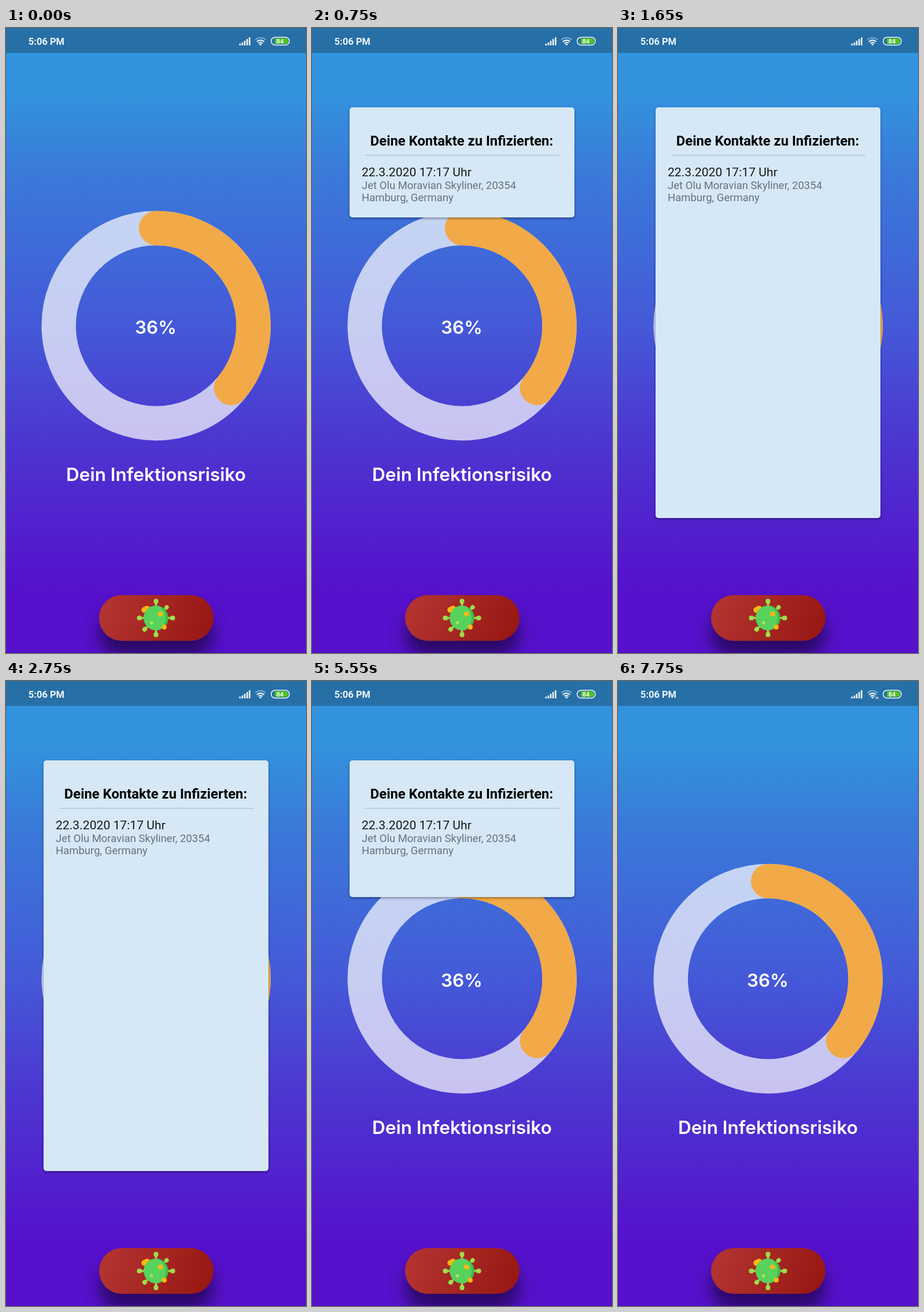
These frames come from a looping animation (519x1079 px, 8 s). An HTML page:

```html
<!DOCTYPE html>
<html lang="de">
<head>
<meta charset="utf-8">
<title>Infektionsrisiko</title>
<style>
  html, body { margin: 0; width: 100%; height: 100%; overflow: hidden; background: #5511cb; }
  svg { display: block; }
  .stage { position: absolute; left: 0; top: 0; width: 519px; height: 1079px; overflow: hidden;
    background: linear-gradient(#3294de 105px, #3a7ad9 250px, #4459d8 515px, #4c38d1 700px, #5511cb 970px); }
  .stage > svg { position: absolute; left: 0; top: 0; }

  .button { position: absolute; left: 160.5px; top: 979px; width: 198px; height: 79px; border-radius: 40px;
    background: linear-gradient(110deg, #b23330 8%, #981713 95%);
    box-shadow: 0 27px 28px rgba(0, 0, 0, .5); }

  .card { position: absolute; left: 65px; top: 137px; width: 389px; height: 0; opacity: 0; overflow: hidden;
    border-radius: 5px; background: #d6e8f6; box-shadow: 0 2px 4px rgba(0, 0, 0, .38);
    animation: card 8s step-end infinite; }
  .traffic { opacity: 0; animation: traffic 8s step-end infinite; }

  /* One step is 50 ms = 0.625 % */
  @keyframes card {
    0%      { height: 0; opacity: 0; }
    8.75%   { height: 71px; opacity: 1; }
    9.375%  { height: 190px; opacity: 1; }
    10%     { height: 310px; opacity: 1; }
    10.625% { height: 430px; opacity: 1; }
    11.25%  { height: 430px; opacity: 1; }
    11.875% { height: 662px; opacity: 1; }
    12.5%   { height: 709px; opacity: 1; }
    67.5%   { height: 591px; opacity: 1; }
    68.125% { height: 473px; opacity: 1; }
    68.75%  { height: 355px; opacity: 1; }
    69.375% { height: 236px; opacity: 1; }
    70%     { height: 118px; opacity: 1; }
    70.625%, 100% { height: 0; opacity: 0; }
  }
  @keyframes traffic {
    0%      { opacity: 0; }
    96.875%, 100% { opacity: .9; }
  }

  .roboto { font-family: Roboto, "Noto Sans", sans-serif; }
  .risk { font: 600 31.5px Inter, "Open Sans", sans-serif; fill: #fff; text-anchor: middle; }
</style>
</head>
<body>
<div class="stage">
  <div class="button"></div>

  <svg width="519" height="1079" viewBox="0 0 519 1079">
    <!-- status bar -->
    <rect width="519" height="43" fill="#000" fill-opacity=".25"/>
    <g class="roboto" fill="#f2f7fb">
      <text x="38.8" y="28.6" font-size="16.5" font-weight="700">5:06 PM</text>
      <path d="M403.5 30v-3h2.6v3zM407.6 30v-5h2.6v5zM411.7 30v-8h2.6v8zM415.9 30v-11h2.6v11zM420.1 30v-14h2.6v14z"/>
      <g fill="none" stroke="#f2f7fb" stroke-width="2.1">
        <path d="M431.4 20.6a12.6 12.6 0 0 1 17.8 0" opacity=".42"/>
        <path d="M434 23.8a8.8 8.8 0 0 1 12.6 0"/>
        <path d="M436.7 26.6a5 5 0 0 1 7.2 0"/>
      </g>
      <path d="M438 28.2a3.2 3.2 0 0 1 4.6 0l-2.3 2.4z"/>
      <path class="traffic" d="M445.8 27h1.5v4h-1.5zM448.7 27h1.5v4h-1.5z"/>
      <rect x="458.7" y="15.9" width="31.4" height="13.6" rx="6.8" fill="none" stroke="#f2f7fb" stroke-width="1.5"/>
      <path d="M465 17.8h18.2a4.9 4.9 0 0 1 0 9.8H465z" fill="#4fc51f"/>
      <text x="474" y="26.8" font-size="11" font-weight="700" text-anchor="middle">84</text>
    </g>

    <!-- risk ring -->
    <g fill="none" stroke-width="59.5">
      <circle cx="259.7" cy="514" r="168.5" stroke="#fff" stroke-opacity=".7"/>
      <circle cx="259.7" cy="514" r="168.5" stroke="#f2a947" pathLength="100" stroke-dasharray="36 64"
        stroke-linecap="round" transform="rotate(-90 259.7 514)"/>
    </g>
    <text class="risk" x="259" y="527.5">36%</text>
    <text class="risk" x="259.5" y="781.5">Dein Infektionsrisiko</text>

    <!-- virus -->
    <defs>
      <g id="spike">
        <path d="M-1.5 -19L-2 -27H2L1.5 -19z"/>
        <rect x="-4" y="-33" width="8" height="8.5" rx="3.6"/>
      </g>
    </defs>
    <g transform="translate(259.5 1018.5)">
      <g fill="#9fdc4b">
        <use href="#spike"/>
        <use href="#spike" transform="rotate(90)"/>
        <use href="#spike" transform="rotate(180)"/>
        <use href="#spike" transform="rotate(270)"/>
        <use href="#spike" transform="rotate(45) scale(.9)"/>
        <use href="#spike" transform="rotate(225) scale(.96)"/>
      </g>
      <path d="M-20 -9a5 5 0 0 1 -.5 -10a6 5 0 0 1 9 -.5a5 5 0 0 1 -1 7z" fill="#fdb813"/>
      <circle r="21.3" fill="#3fbb4b"/>
      <path d="M5 -20.7A21.3 21.3 0 1 0 5 20.7A24 24 0 0 0 5 -20.7z" fill="#57d25d"/>
      <ellipse cx="7.7" cy="-6.9" rx="4.7" ry="4.1" fill="#fdb813"/>
      <circle cx="14.3" cy="15.7" r="4.3" fill="#fdb813"/>
      <circle cx="-7.7" cy="8.3" r="2.7" fill="#b4e35a"/>
    </g>
  </svg>

  <div class="card">
    <svg class="roboto" width="389" height="709" viewBox="65 137 389 709">
      <text x="259" y="202.5" font-size="23.8" font-weight="700" text-anchor="middle">Deine Kontakte zu Infizierten:</text>
      <path d="M92 219.8H428" stroke="#b7c5d0" stroke-width="1.4"/>
      <text x="86" y="255.5" font-size="21.14" fill="#14171a">22.3.2020 17:17 Uhr</text>
      <g font-size="18.5" fill="#66717a">
        <text x="86" y="278">Jet Olu Moravian Skyliner, 20354</text>
        <text x="86" y="299.2">Hamburg, Germany</text>
      </g>
    </svg>
  </div>
</div>
</body>
</html>
```
